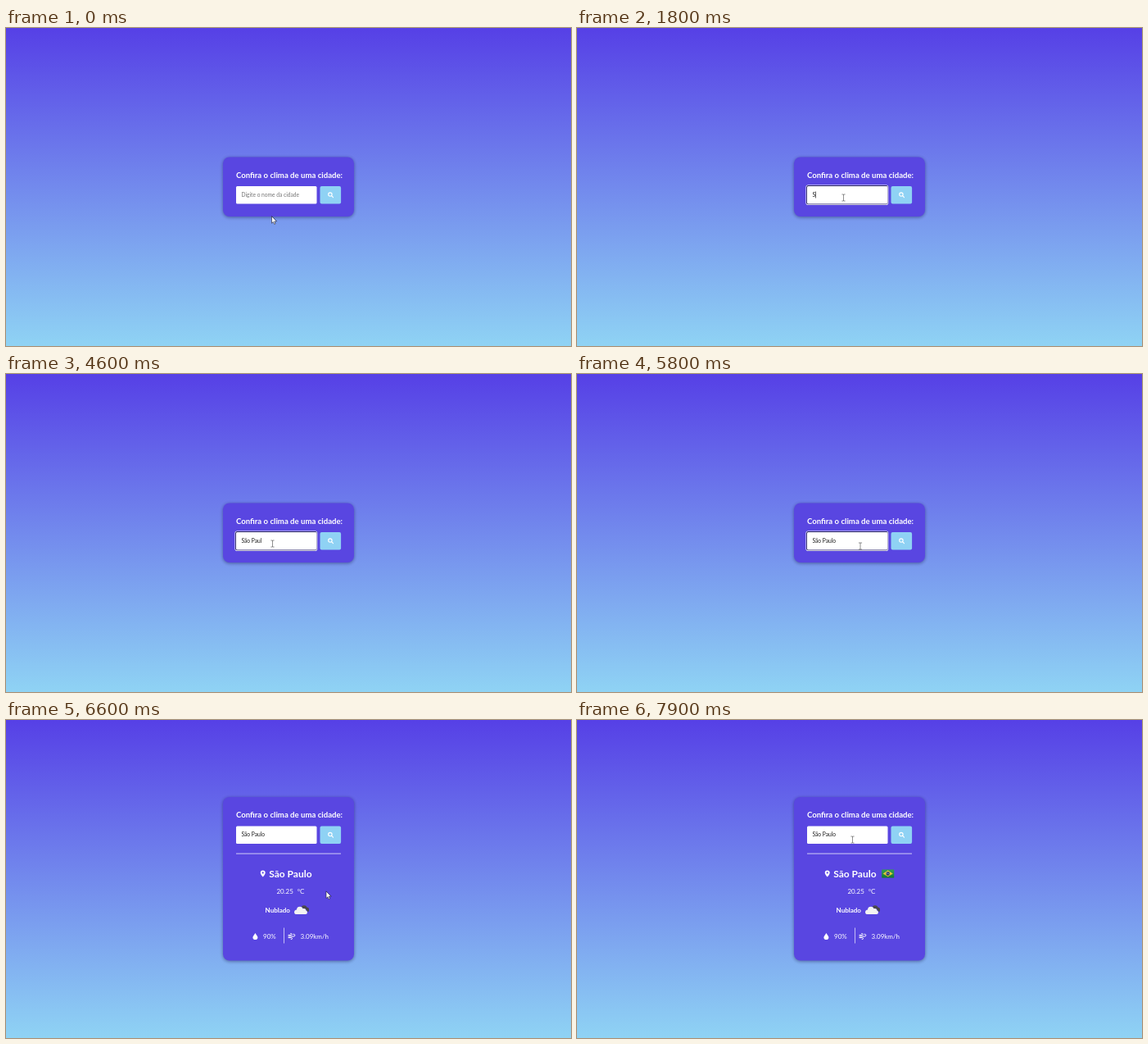
Write an HTML page with a canvas that moves like this. It is 690 px wide and 388 px high and loops after 8000 ms.

```html
<!DOCTYPE html>
<html lang="pt-BR">
<head>
<meta charset="utf-8">
<title>Clima</title>
<style>
  html, body { margin: 0; width: 100%; height: 100%; overflow: hidden; background: #7389ed; }
  canvas { display: block; width: 100vw; height: 100vh; }
</style>
</head>
<body>
<canvas id="stage"></canvas>
<script>
const W = 690, H = 388, LOOP = 8000, STEP = 100;
const canvas = document.getElementById('stage');
const ctx = canvas.getContext('2d');
const CARD = '#5946e1', SKY = '#8fd2f4';

// [start, text, caret visible]
const typing = [
  [0, '', 0], [700, '', 1], [1200, 'S', 1], [1300, 'S', 0], [1800, 'S', 1],
  [2200, 'Sã', 1], [2300, 'São', 1], [2400, 'São', 0], [2600, 'São ', 1],
  [2800, 'São ', 0], [3000, 'São P', 1], [3200, 'São Pa', 1], [3400, 'São Pa', 0],
  [3900, 'São Pa', 1], [4000, 'São Pau', 1], [4200, 'São Paul', 1],
  [4400, 'São Paul', 0], [4900, 'São Paul', 1], [5000, 'São Paulo', 1],
  [5500, 'São Paulo', 0], [6000, 'São Paulo', 1], [6200, 'São Paulo', 0]
];

// [time, x, y] of the pointer
const path = [
  [0, 324.5, 230], [100, 318, 219], [200, 306, 196], [300, 301, 181],
  [400, 301, 181], [500, 305, 188], [600, 319, 203], [700, 325.5, 207],
  [5600, 325.5, 207], [5700, 331, 208], [5800, 346, 210], [5900, 368, 212],
  [6000, 386, 211], [6100, 391, 209.3], [7000, 391, 209.3], [7100, 390, 207],
  [7300, 378, 193], [7500, 358, 169], [7700, 343, 151], [7900, 336.5, 146]
];

function pointerAt(t) {
  let i = 0;
  while (i < path.length - 2 && t >= path[i + 1][0]) i++;
  const [t0, x0, y0] = path[i], [t1, x1, y1] = path[i + 1];
  const k = Math.min(1, (t - t0) / (t1 - t0));
  return [x0 + (x1 - x0) * k, y0 + (y1 - y0) * k];
}

function roundRect(x, y, w, h, r, fill) {
  ctx.beginPath();
  ctx.roundRect(x, y, w, h, r);
  ctx.fillStyle = fill;
  ctx.fill();
}

function disc(x, y, r, fill) {
  ctx.beginPath();
  ctx.arc(x, y, r, 0, 7);
  ctx.fillStyle = fill;
  ctx.fill();
}

function text(str, x, y, size, weight = 400, fill = '#fff') {
  ctx.font = `${weight} ${size}px Lato, sans-serif`;
  ctx.fillStyle = fill;
  ctx.fillText(str, x, y);
}

function shape(d, x, y, fill, stroke, width = 1) {
  ctx.save();
  ctx.translate(x, y);
  const p = new Path2D(d);
  if (fill) { ctx.fillStyle = fill; ctx.fill(p); }
  if (stroke) {
    ctx.strokeStyle = stroke;
    ctx.lineWidth = width;
    ctx.lineCap = ctx.lineJoin = 'round';
    ctx.stroke(p);
  }
  ctx.restore();
}

function background() {
  const g = ctx.createLinearGradient(0, 0, 0, H);
  g.addColorStop(0, '#5640e6');
  g.addColorStop(1, '#8fd3f4');
  ctx.fillStyle = g;
  ctx.fillRect(0, 0, W, H);
}

function card(top, height, scale) {
  ctx.save();
  ctx.shadowColor = 'rgba(20,20,70,.5)';
  ctx.shadowBlur = 4 * scale;
  ctx.shadowOffsetY = scale;
  roundRect(265, top, 160, height, 8, CARD);
  ctx.restore();
}

function button(top, grow) {
  ctx.save();
  ctx.translate(396.3, top + 46.2);
  ctx.scale(grow, grow);
  roundRect(-12.8, -10.7, 25.6, 21.4, 2, SKY);
  shape('M2.2 -.7a2.2 2.2 0 1 1 -4.4 0a2.2 2.2 0 1 1 4.4 0M1.7 1L3.6 2.9', -.4, 0, null, '#fff', 1.15);
  ctx.restore();
}

function form(t, top) {
  text('Confira o clima de uma cidade:', 281, top + 25.4, 9.6, 700);
  if (t >= 700 && t < 6200) {
    roundRect(279.5, top + 34, 100.8, 24.4, 2.6, '#fff');
    roundRect(280.1, top + 34.6, 99.6, 23.2, 2.1, '#251f66');
  }
  roundRect(281, top + 35.5, 98.5, 21.4, 1.5, '#fff');

  const [, typed, caret] = typing.findLast(s => t >= s[0]);
  const base = top + 48.4;
  if (typed) text(typed, 287.4, base, 6.667, 400, '#1c1c1c');
  else text('Digite o nome da cidade', 287.4, base, 6.667, 400, '#757575');
  if (caret) {
    ctx.font = '400 6.667px Lato, sans-serif';
    ctx.fillStyle = '#222';
    ctx.fillRect(287.4 + ctx.measureText(typed).width, top + 42, .7, 8);
  }
  const hover = t < 6600 ? Math.max(0, Math.min(1, (t - 5900) / 200)) : 0;
  button(top, 1 + .1 * hover);
}

function flag(x, y) {
  const w = 15, h = 10;
  roundRect(x, y, w, h, .5, '#16903a');
  shape('M7.5 1.1L13.6 5L7.5 8.9L1.4 5Z', x, y, '#f3d52b');
  disc(x + w / 2, y + h / 2, 2.3, '#20326f');
  shape('M5.5 4.5Q7.8 4.2 9.5 5.7', x, y, null, '#d8e0ee', .45);
  const g = ctx.createLinearGradient(0, y, 0, y + h);
  g.addColorStop(0, 'rgba(255,255,255,.12)');
  g.addColorStop(1, 'rgba(0,0,0,.18)');
  roundRect(x, y, w, h, .5, g);
}

function clouds() {
  const dark = '#48484a', light = '#f2f2f2';
  disc(364, 229.6, 3.4, dark);
  disc(367.3, 231.3, 2.7, dark);
  roundRect(360, 230, 10, 4, 2, dark);
  const puff = (grow, fill) => {
    disc(358.8, 231.6, 3.8 + grow, fill);
    disc(363.5, 233, 2.9 + grow, fill);
    disc(354.9, 234.2, 2.6 + grow, fill);
    roundRect(352.2 - grow, 232.4 - grow, 15.8 + 2 * grow, 4.6 + 2 * grow, 2.3, fill);
  };
  puff(.35, CARD);
  puff(0, light);
}

function results(t) {
  ctx.fillStyle = 'rgba(255,255,255,.8)';
  ctx.fillRect(281, 162.6, 128, .9);

  const loaded = t >= 7100;
  const x = loaded ? 313.2 : 321.2;
  shape('M0 4C-1 2.6 -3 .4 -3 -1.2A3 3 0 0 1 3 -1.2C3 .4 1 2.6 0 4Z', x - 7.5, 187.6, '#fff');
  disc(x - 7.5, 186.4, 1.05, CARD);
  text('São Paulo', x, 191.8, 12, 700);
  if (loaded) flag(372.2, 182.4);

  text('20.25', 330.4, 212.3, 8);
  text('°C', 355.8, 212.3, 8);
  text('Nublado', 316.6, 234.8, 8, 700);
  clouds();

  shape('M0 -4C.8 -2.3 3 -.4 3 1.2A3 2.8 0 0 1 -3 1.2C-3 -.4 -.8 -2.3 0 -4Z', 304.4, 264, '#fff');
  text('90%', 314, 266.9, 8);
  ctx.fillStyle = 'rgba(255,255,255,.8)';
  ctx.fillRect(339, 253.5, .8, 19);
  shape('M-4 -1.6H-.6A1 1 0 0 0 -.7 -3.5H-1.3M-4 0H2.5A1.3 1.3 0 0 0 2.5 -2.6H1.8M-4 1.6H-.1A1 1 0 0 1 -.2 3.5H-.8',
    349, 264, null, '#fff', 1);
  text('3.09km/h', 359.5, 266.9, 8);
}

function pointer(t) {
  const [x, y] = pointerAt(t);
  const overTitle = t >= 300 && t < 500;
  const overInput = (t >= 600 && t < 5900) || (t >= 7700);
  if (overTitle || overInput) {
    const tone = overTitle ? '#e8e8ff' : '#555';
    shape('M-1.7 -4H-.5L0 -3.7L.5 -4H1.7M0 -3.7V3.7M-1.7 4H-.5L0 3.7L.5 4H1.7', x, y, null, tone, .65);
  } else if (t >= 6000 && t < 6600) {
    shape('M-.9 .8Q0 -.6 .9 .8V4L4 4.7Q4.8 5 4.7 6L4 9V10.5H-.5V9.3L-2.7 6.3Q-3 5 -1.9 5.2L-.9 6.2Z',
      x + .3, y, '#fff', '#23232e', .6);
    shape('M2 4.3V6M3.3 4.6V6.1', x + .3, y, null, '#23232e', .4);
  } else {
    shape('M0 0V8.2L1.9 6.5L3.2 9.4L4.6 8.8L3.3 5.9H5.8Z', x, y, '#fff', '#1b1b2a', .6);
  }
}

function draw(now) {
  const scaleX = innerWidth / W * devicePixelRatio;
  const scaleY = innerHeight / H * devicePixelRatio;
  const w = Math.round(W * scaleX), h = Math.round(H * scaleY);
  if (canvas.width !== w || canvas.height !== h) {
    canvas.width = w;
    canvas.height = h;
  }
  ctx.setTransform(scaleX, 0, 0, scaleY, 0, 0);
  const t = Math.floor(now % LOOP / STEP) * STEP;
  const open = t >= 6600;
  const top = open ? 94 : 157.5;
  background();
  card(top, open ? 199.6 : 72.6, scaleY);
  form(t, top);
  if (open) results(t);
  pointer(t);
}

const start = performance.now();
function tick() {
  draw(performance.now() - start);
  requestAnimationFrame(tick);
}
tick();
</script>
</body>
</html>
```
